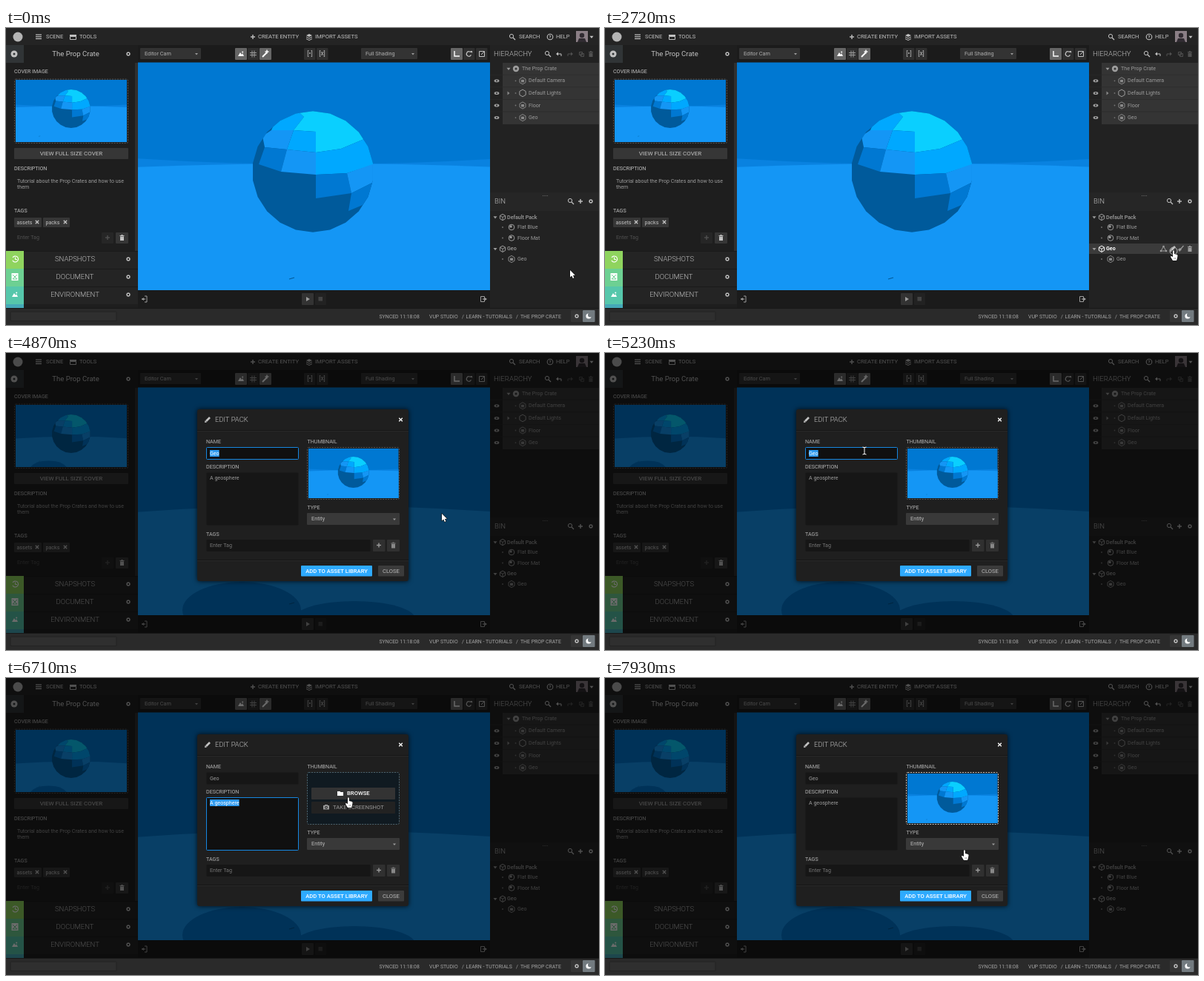
These frames come from a looping animation (800x401 px, 8 s). An HTML page with a canvas:

```html
<!DOCTYPE html>
<html lang="en">
<head>
<meta charset="utf-8">
<title>Scene editor</title>
<style>
html, body { margin: 0; width: 100%; height: 100%; overflow: hidden; background: #1c1c1c; }
canvas { display: block; width: 800px; height: 401px; }
</style>
</head>
<body>
<canvas id="stage"></canvas>
<script>
const LOOP = 8000;
const canvas = document.getElementById('stage');
const ctx = canvas.getContext('2d');
const dpr = window.devicePixelRatio || 1;
canvas.width = 800 * dpr;
canvas.height = 401 * dpr;

const GREY = '#9c9c9c', PALE = '#c2c2c2', DIM = '#505050', FIELD = '#161616';
const BLUE = { cyan: '#0acfff', sky: '#00a8ff', light: '#1496f5', mid: '#0078d2', dark: '#005a9b' };

// Pointer stops: time, x, y, shape
const POINTER = [
  [0, 761, 327, 'arrow'], [200, 762, 325, 'arrow'], [630, 763, 312, 'arrow'],
  [780, 766, 308, 'hand'], [1180, 769, 305, 'hand'], [1300, 768, 306, 'hand'],
  [1450, 768, 303, 'hand'], [1570, 767, 302, 'hand'], [1820, 767, 301, 'hand'],
  [2850, 767, 301, 'arrow'], [4870, 588, 217, 'arrow'], [4990, 480, 165, 'arrow'],
  [5110, 398, 143, 'arrow'], [5230, 350, 132, 'beam'], [5350, 313, 130, 'beam'],
  [5480, 316, 132, 'beam'], [5630, 318, 133, 'beam'], [6310, 386, 162, 'beam'],
  [6430, 432, 160, 'hand'], [6560, 460, 161, 'hand'], [6710, 462, 162, 'hand'],
  [6990, 480, 169, 'hand'], [7110, 515, 179, 'hand'], [7230, 468, 176, 'hand'],
  [7660, 469, 177, 'hand'], [7810, 476, 206, 'arrow'], [7930, 485, 233, 'hand']
];

function rect(x, y, w, h, fill) {
  ctx.fillStyle = fill;
  ctx.fillRect(x, y, w, h);
}
function round(x, y, w, h, r, fill, stroke) {
  ctx.beginPath();
  ctx.roundRect(x, y, w, h, r);
  if (fill) { ctx.fillStyle = fill; ctx.fill(); }
  if (stroke) { ctx.strokeStyle = stroke; ctx.lineWidth = 1; ctx.stroke(); }
}
function trace(points, close) {
  ctx.beginPath();
  for (let i = 0; i < points.length; i += 2) ctx.lineTo(points[i], points[i + 1]);
  if (close) ctx.closePath();
}
function poly(points, fill) {
  trace(points, true);
  ctx.fillStyle = fill;
  ctx.fill();
}
function line(points, color = GREY, width = 1, close = false) {
  trace(points, close);
  ctx.strokeStyle = color;
  ctx.lineWidth = width;
  ctx.stroke();
}
function disc(x, y, r, fill) {
  ctx.beginPath();
  ctx.arc(x, y, r, 0, 7);
  ctx.fillStyle = fill;
  ctx.fill();
}
function ring(x, y, r, color = GREY, width = 1, from = 0, to = 6.29) {
  ctx.beginPath();
  ctx.arc(x, y, r, from, to);
  ctx.strokeStyle = color;
  ctx.lineWidth = width;
  ctx.stroke();
}
function ngon(x, y, r, sides) {
  const points = [];
  for (let i = 0; i < sides; i++) {
    const a = i * 2 * Math.PI / sides;
    points.push(x + r * Math.sin(a), y - r * Math.cos(a));
  }
  return points;
}
function text(s, x, y, size = 7.1, color = GREY, weight = 400, align = 'left') {
  ctx.font = `${weight} ${size}px Roboto, "Open Sans", sans-serif`;
  ctx.fillStyle = color;
  ctx.textAlign = align;
  ctx.textBaseline = 'middle';
  ctx.fillText(s, x, y);
}

// Icons
function gear(x, y, c = PALE) {
  for (let i = 0; i < 8; i++) {
    const a = i * Math.PI / 4, u = Math.cos(a), v = Math.sin(a);
    line([x + u * 1.5, y + v * 1.5, x + u * 3, y + v * 3], c, 1.1);
  }
  ring(x, y, 1.8, c, 1.1);
}
function search(x, y, c = PALE) {
  ring(x - 1, y - 1, 2.6, c, 1);
  line([x + 1, y + 1, x + 4, y + 4], c, 1.3);
}
function plus(x, y, c = PALE, r = 3) {
  line([x - r, y, x + r, y], c, 1.4);
  line([x, y - r, x, y + r], c, 1.4);
}
function cross(x, y, r, c) {
  line([x - r, y - r, x + r, y + r], c, 1.3);
  line([x - r, y + r, x + r, y - r], c, 1.3);
}
function trash(x, y, c = GREY) {
  rect(x - 3, y - 3, 6, 1, c);
  rect(x - 1, y - 4, 2, 1, c);
  rect(x - 2.5, y - 1.5, 5, 5.5, c);
}
function caret(x, y, c = GREY, r = 2) {
  poly([x - r, y - r / 2, x + r, y - r / 2, x, y + r * .8], c);
}
function hex(x, y, r, c = GREY) {
  line(ngon(x, y, r, 6), c, 1, true);
}
function cube(x, y, c = GREY) {
  hex(x, y, 4.2, c);
  line([x - 3.5, y - 2, x, y, x + 3.5, y - 2], c, .9);
  line([x, y, x, y + 4], c, .9);
}
function entity(x, y) {
  hex(x, y, 4.6, '#888');
  rect(x - 2, y - 1.5, 4, 3.5, '#888');
}
function material(x, y) {
  ring(x, y, 3.8, GREY, 1);
  poly([x - 2.5, y - 2.5, x + .5, y - 2.5, x + .5, y + .5, x - 2.5, y + .5], GREY);
}
function eye(x, y) {
  ctx.beginPath();
  ctx.ellipse(x, y, 3.4, 2, 0, 0, 7);
  ctx.fillStyle = GREY;
  ctx.fill();
  disc(x, y, 1, '#222');
}
function hill(x, y, c) {
  poly([x - 4, y + 3, x - 1, y - 2, x + 1, y + 1, x + 2, y - 1, x + 4, y + 3], c);
  disc(x + 2.2, y - 2.5, 1, c);
}
function curl(x, y, c, dir) {
  line([x + 3 * dir, y + 3, x + 3 * dir, y, x - 2 * dir, y], c, 1);
  poly([x - 4 * dir, y, x - dir, y - 2.5, x - dir, y + 2.5], c);
}
function brush(x, y, c) {
  line([x + 3.5, y - 4, x, y], c, 1.2);
  poly([x - 4, y + 1, x - 1, y - 1, x + 1, y + 1, x - 2, y + 4], c);
}
function pencil(x, y, c) {
  line([x - 2, y + 2, x + 3, y - 3], c, 2.6);
  poly([x - 4, y + 4, x - 3.4, y + 1, x - 1, y + 3.4], c);
}

function sphere() {
  ctx.save();
  trace(ngon(414, 194, 81.8, 22), true);
  ctx.clip();
  rect(330, 110, 168, 168, BLUE.dark);
  poly([358, 138, 366, 120, 391, 110, 402, 120, 388, 138], BLUE.sky);
  poly([391, 110, 450, 105, 500, 145, 483, 150, 452, 163, 418, 168, 418, 140, 388, 138, 402, 120], BLUE.cyan);
  poly([388, 138, 418, 140, 418, 168, 452, 163, 483, 150, 500, 145, 500, 183, 460, 196, 418, 198, 418, 168, 379, 164], BLUE.sky);
  poly([349, 161, 346, 146, 358, 138, 388, 138, 379, 164], BLUE.light);
  poly([341, 184, 349, 161, 379, 164, 371, 194], BLUE.mid);
  poly([379, 164, 418, 168, 418, 198, 371, 194], BLUE.light);
  poly([418, 198, 460, 196, 466, 223, 418, 230], BLUE.mid);
  poly([460, 196, 500, 182, 500, 206, 466, 223], BLUE.light);
  poly([466, 223, 500, 206, 493, 234, 462, 247], BLUE.mid);
  ctx.restore();
}

function fillBelow(edge, bend, color) {
  ctx.beginPath();
  ctx.moveTo(-5, edge);
  ctx.quadraticCurveTo(237, edge + bend, 490, edge);
  ctx.lineTo(490, 340);
  ctx.lineTo(-5, 340);
  ctx.fillStyle = color;
  ctx.fill();
}

// The rendered view, also used scaled down for the pictures
function scene(x, y, w, h, scale, lift, speckX, speckY, dim) {
  ctx.save();
  ctx.beginPath();
  ctx.rect(x, y, w, h);
  ctx.clip();
  ctx.translate(x, y - lift);
  ctx.scale(scale, scale);
  rect(-5, -5, 495, 345, BLUE.mid);
  if (dim) fillBelow(168, -18, BLUE.light);
  else {
    fillBelow(129, 16, '#0982e0');
    fillBelow(141, -10, BLUE.light);
  }
  if (dim) {
    ctx.fillStyle = BLUE.mid;
    for (const [cx, cy, rx, ry] of [[140, 300, 80, 38], [292, 312, 82, 24]]) {
      ctx.beginPath();
      ctx.ellipse(cx, cy, rx, ry, 0, 0, 7);
      ctx.fill();
    }
  }
  line([speckX - 3, speckY + 1, speckX + 4, speckY - 1], BLUE.dark, 1.2);
  ctx.translate(-178, -47);
  sphere();
  ctx.restore();
}
function dashed(x, y, w, h, color) {
  ctx.setLineDash([2, 1.5]);
  round(x, y, w, h, 2, null, color);
  ctx.setLineDash([]);
}

function topBar() {
  rect(0, 0, 800, 23, '#242424');
  disc(16, 12, 6.5, '#b4b4b4');
  for (let i = 0; i < 3; i++) rect(40, 8.5 + i * 2.7, 8, 1.2, PALE);
  text('SCENE', 54, 12, 7.5, PALE);
  rect(86, 9, 9, 2, PALE);
  round(86.5, 11.5, 8, 4, 0, null, PALE);
  text('TOOLS', 99, 12, 7.5, PALE);
  plus(333, 12, PALE);
  text('CREATE ENTITY', 340, 12, 7.7, PALE);
  poly([405, 10, 409, 8, 413, 10, 409, 12], PALE);
  line([405, 12, 409, 14, 413, 12], PALE);
  line([405, 14.5, 409, 16.5, 413, 14.5], PALE);
  text('IMPORT ASSETS', 417, 12, 7.7, PALE);
  search(683, 12);
  text('SEARCH', 692, 12, 7.5, PALE);
  ring(734, 12, 3.8, PALE, 1.1);
  text('?', 734, 12.3, 6, PALE, 700, 'center');
  text('HELP', 742, 12, 7.5, PALE);
  rect(769, 4, 16, 15, '#8b7f86');
  disc(777, 10, 3.2, '#302b31');
  poly([771, 19, 773, 14, 781, 14, 783, 19], '#302b31');
  caret(790, 12, PALE, 2.5);
}

function sidebar(dim) {
  rect(0, 23, 178, 355, '#1e1e1e');
  rect(0, 23, 24, 24, '#303436');
  disc(11, 35, 4.5, PALE);
  disc(11, 35, 1.5, '#303436');
  text('The Prop Crate', 94, 35, 9.6, PALE, 400, 'center');
  gear(165, 35);
  rect(174, 47, 4, 260, '#303030');
  text('COVER IMAGE', 11, 59, 7.1, PALE);
  scene(13, 70, 150, 84, .317, 7.6, 101, 264, dim);
  dashed(11.5, 69, 153, 86.5, '#555');
  round(11, 162, 154, 15, 1, '#363636');
  text('VIEW FULL SIZE COVER', 88, 170, 8, PALE, 400, 'center');
  text('DESCRIPTION', 11, 190, 7.1, PALE);
  text('Tutorial about the Prop Crates and how to use', 15, 207, 7.1, GREY);
  text('them', 15, 215, 7.1, GREY);
  text('TAGS', 11, 247, 7.1, PALE);
  for (const [name, x, w] of [['assets', 11, 37], ['packs', 50, 36]]) {
    round(x, 256, w, 13, 1, '#363636');
    text(name, x + 3.5, 262.5, 7.1, PALE);
    cross(x + w - 6, 262, 2.2, PALE);
  }
  text('Enter Tag', 15, 283, 7.1, '#505050');
  round(129, 276, 16, 15, 1, '#262626');
  plus(137, 283, DIM);
  round(148, 276, 17, 15, 1, '#363636');
  trash(156.5, 283, PALE);
  const tabs = [['SNAPSHOTS', '#8fd45e'], ['DOCUMENT', '#6dd092'], ['ENVIRONMENT', '#56c7ab']];
  tabs.forEach(([name, color], i) => {
    const y = 301 + i * 24;
    rect(0, y, 178, 24, '#242424');
    rect(24, y, 154, 1, '#1a1a1a');
    rect(0, y, 24, 24, color);
    text(name, 93, y + 11, 9.5, PALE, 300, 'center');
    gear(165, y + 11);
  });
  rect(0, 373, 24, 5, '#45a9b8');
  ring(12.5, 312, 4, '#fff', 1.2, -2.6, 2.7);
  line([12.5, 309.5, 12.5, 312.5, 15, 312.5], '#fff');
  rect(7.5, 331, 9, 10, '#fff');
  line([9, 333, 15, 339, 9, 339, 15, 333], '#6dd092', 1);
  hill(12, 360, '#fff');
}

function select(label, x, y, w) {
  round(x, y, w, 15, 1, '#333');
  text(label, x + 6, y + 7.5, 7.3, '#b0b0b0');
  caret(x + w - 6, y + 8, GREY);
}
function viewport(dim) {
  rect(178, 23, 475, 355, '#1b1b1b');
  select('Editor Cam', 181, 27, 82);
  select('Full Shading', 479, 27, 76);
  for (const x of [309, 342, 600]) round(x, 27, 16, 16, 1, '#666');
  for (const x of [326, 402, 419, 617, 634]) round(x, 27, 15.5, 16, 1, '#2f2f2f');
  hill(317, 35, '#fff');
  for (const d of [-1.5, 1.5]) {
    line([329, 35 + d, 338, 35 + d], GREY, 1);
    line([333.5 + d, 30.5, 333.5 + d, 39.5], GREY, 1);
  }
  line([346, 39, 352, 33], '#fff', 2);
  plus(352, 32, '#fff', 2.5);
  text('[•]', 410, 34.5, 8.5, PALE, 400, 'center');
  text('[x]', 426.5, 34.5, 8.5, PALE, 400, 'center');
  line([605, 31, 605, 38, 612, 38], '#fff', 1.4);
  ring(624.5, 35, 3.2, PALE, 1.2, .4, 5.6);
  poly([626, 31, 629, 31, 629, 34], PALE);
  round(638.5, 31.5, 7, 7, 0, null, PALE);
  line([641, 36, 645, 32], PALE);
  scene(178, 46.5, 475, 307.5, 1, -.5, 207, 291, dim);
  line([187, 362, 190, 362, 190, 370, 187, 370], GREY);
  line([183, 366, 188, 366], GREY, 1.2);
  poly([183, 366, 186, 364, 186, 368], GREY);
  round(399, 358, 16, 16, 1, '#333');
  poly([405, 363, 410, 366, 405, 369], GREY);
  round(417, 358, 15, 16, 1, '#222');
  rect(421.5, 363, 5.5, 5.5, '#444');
  round(640.5, 362.5, 5, 7, 0, null, GREY);
  line([643, 366, 648, 366], GREY, 1.2);
  poly([649, 366, 646, 364, 646, 368], GREY);
}

function hierarchy() {
  rect(653, 23, 147, 355, '#222');
  text('HIERARCHY', 658, 35.5, 9.6, PALE, 300);
  search(731, 35);
  curl(746, 35, PALE, 1);
  curl(761, 35, DIM, -1);
  round(773.5, 32.5, 4, 4, 0, null, DIM);
  round(775.5, 34.5, 4, 4, 0, null, DIM);
  trash(789, 35, DIM);
  rect(670, 47, 130, 83, '#343434');
  caret(678, 55, GREY, 2.5);
  disc(688, 55, 4.2, GREY);
  disc(688, 55, 1.5, '#343434');
  text('The Prop Crate', 696, 55, 7.1, GREY);
  ['Default Camera', 'Default Lights', 'Floor', 'Geo'].forEach((name, i) => {
    const y = 71.3 + i * 16.6;
    rect(653, y - 8.5, 147, .7, '#2a2a2a');
    eye(662, y);
    if (i === 1) {
      poly([676.5, y - 2.5, 679.5, y, 676.5, y + 2.5], '#888');
      hex(697, y, 4.8);
    } else entity(697, y);
    disc(687.5, y, .9, '#777');
    text(name, 705, y, 7.1, GREY);
  });
}

function bin(hover) {
  rect(653, 222, 147, 25, '#262626');
  for (let i = 0; i < 4; i++) rect(724 + i * 2, 226, 1, 1, '#666');
  text('BIN', 659, 234.5, 9.5, PALE, 300);
  search(762, 234);
  plus(775, 234);
  gear(789, 234);
  if (hover === 'pack') rect(653, 291, 147, 14, '#3b3b3b');
  if (hover === 'item') rect(653, 306, 147, 13, '#3b3b3b');
  const pack = (name, y, hot) => {
    const c = hot ? '#fff' : GREY;
    caret(660, y, GREY, 2.5);
    cube(670, y, c);
    text(name, 676, y, 7.1, c, hot ? 700 : 500);
  };
  const item = (name, y, icon, hot) => {
    disc(670, y, .9, '#777');
    icon(682, y);
    text(name, 690, y, 7.1, hot ? '#fff' : GREY);
  };
  pack('Default Pack', 255.5, false);
  item('Flat Blue', 269, material, false);
  item('Floor Mat', 283.5, material, false);
  pack('Geo', 298.3, hover === 'pack');
  item('Geo', 312, entity, hover === 'item');
  if (hover === 'pack') {
    line([750, 301, 753.5, 295, 757, 301], GREY, 1, true);
    for (const [x, y] of [[750, 301], [753.5, 295], [757, 301]]) disc(x, y, 1.3, GREY);
    pencil(766, 298, PALE);
    brush(777, 298, GREY);
    trash(789, 298, GREY);
  }
}

function statusBar() {
  rect(0, 378, 800, 23, '#2a2a2a');
  rect(0, 378, 800, 1, '#181818');
  round(6, 383, 143, 12.5, 1, '#2f2f2f', '#222');
  const label = (s, x) => text(s, x, 389.5, 6.9, '#a4a4a4');
  label('SYNCED 11:18:08', 503.5);
  label('VUP STUDIO', 571);
  label('/', 615);
  label('LEARN - TUTORIALS', 620.5);
  label('/', 688);
  label('THE PROP CRATE', 694);
  round(762, 381, 16, 16, 1, '#353535');
  gear(770, 389, PALE);
  round(778, 381, 16.5, 16, 1, '#737b80');
  disc(786, 389, 3.6, '#fff');
  disc(788, 387.5, 3, '#737b80');
}

function field(x, y, w, h, focused) {
  round(x, y, w, h, 1, focused ? '#101010' : FIELD, focused ? '#1687e0' : null);
}
function marked(s, x, y, on) {
  if (on) {
    ctx.font = '400 7.1px Roboto, "Open Sans", sans-serif';
    rect(x, y - 4.5, ctx.measureText(s).width, 9, '#2f9bf0');
  }
  text(s, x, y, 7.1, on ? '#fff' : GREY);
}
function thumbnail(t, mx, my) {
  const over = mx >= 406 && mx < 531 && my >= 127 && my < 198;
  if (!over) {
    scene(408, 129, 121.5, 67, .257, 5.8, 101, 264, false);
    dashed(406.5, 127.5, 124, 70, t > 7600 ? '#c8c8c8' : '#555');
    return;
  }
  rect(407, 128, 123, 69, '#101a21');
  dashed(406.5, 127.5, 124, 70, '#4b6470');
  const inX = mx >= 412 && mx <= 525;
  const browse = inX && my >= 148 && my < 164;
  const shot = inX && my >= 166 && my < 183;
  round(412, 148, 113, 16, 1, '#333');
  round(412, 167, 113, 16, 1, '#222');
  const a = browse ? '#fff' : '#999', b = shot ? '#fff' : '#999';
  rect(447, 153, 4, 2, a);
  rect(447, 154, 8, 5, a);
  text('BROWSE', 460, 156, 7.7, a, browse ? 500 : 400);
  rect(428, 172, 8, 5.5, b);
  rect(430, 171, 4, 2, b);
  ring(432, 174.7, 1.5, '#222', 1);
  text('TAKE SCREENSHOT', 441, 175, 7.7, b, shot ? 500 : 400);
}
function modal(t, mx, my) {
  const focus = t < 5630 ? 'name' : t < 7540 ? 'about' : '';
  ctx.save();
  ctx.shadowColor = 'rgba(0,0,0,.8)';
  ctx.shadowBlur = 6 * dpr;
  round(258, 76, 285, 232, 3, '#1f1f1f');
  ctx.restore();
  rect(258, 104, 285, 1, '#151515');
  rect(258, 105, 285, 1, '#292929');
  rect(258, 279, 285, 1, '#151515');
  rect(258, 280, 285, 1, '#292929');
  pencil(272, 90, PALE);
  text('EDIT PACK', 282, 90, 9.4, PALE, 300);
  cross(532.5, 90, 2.3, '#fff');
  text('NAME', 270, 120, 7.1, '#b4b4b4');
  field(270.5, 127.5, 124, 16, focus === 'name');
  marked('Geo', 275, 135.5, focus === 'name');
  text('DESCRIPTION', 270, 154, 7.1, '#b4b4b4');
  field(270.5, 161.5, 124, 71, focus === 'about');
  marked('A geosphere', 275, 168.5, focus === 'about');
  text('THUMBNAIL', 406.5, 120, 7.1, '#b4b4b4');
  thumbnail(t, mx, my);
  text('TYPE', 406.5, 208.5, 7.1, '#b4b4b4');
  round(406, 216, 125, 16, 1, '#393939');
  text('Entity', 412, 224, 7.3, '#bbb');
  caret(524, 224.5, GREY);
  text('TAGS', 270, 244.5, 7.1, '#b4b4b4');
  field(270.5, 252, 221, 16, false);
  text('Enter Tag', 275, 260, 7.1, '#777');
  round(495, 252, 16.5, 16, 1, '#303030');
  plus(503, 259.5, GREY);
  round(514, 252, 17, 16, 1, '#303030');
  trash(522.5, 259.5, '#888');
  round(398, 287, 96, 14.5, 1, '#2eaaff');
  text('ADD TO ASSET LIBRARY', 446, 294.3, 7.6, '#fff', 500, 'center');
  round(502, 287, 35, 14.5, 1, '#3b3b3b');
  text('CLOSE', 519.5, 294.3, 7.6, '#bbb', 400, 'center');
}

function pointer(x, y, shape) {
  ctx.save();
  ctx.translate(x, y);
  ctx.lineJoin = 'round';
  if (shape === 'beam') {
    line([-2.5, -5, 0, -4.3, 2.5, -5], '#fff', 1);
    line([-2.5, 5, 0, 4.3, 2.5, 5], '#fff', 1);
    line([0, -4.5, 0, 4.5], '#fff', 1);
  } else {
    const shapeOf = {
      arrow: [0, 0, 0, 9.5, 2.2, 7.5, 3.8, 11, 5.4, 10.2, 3.9, 7, 6.8, 6.7],
      hand: [-1, -.5, .8, -.5, 1, 4, 5, 5, 5.6, 6.2, 5, 10, 4, 13, -1, 13, -4, 8, -3.4, 6.8, -1, 8]
    };
    line(shapeOf[shape], '#111', 1.2, true);
    poly(shapeOf[shape], '#fff');
    if (shape === 'hand') for (const u of [1, 2.6]) line([u, 9, u, 11.5], '#777', .6);
  }
  ctx.restore();
}

function draw(t) {
  const [, mx, my, shape] = POINTER.findLast(stop => stop[0] <= t);
  const open = t >= 2850;
  const hover = open || t < 780 ? '' : t < 1450 ? 'item' : 'pack';
  ctx.setTransform(dpr, 0, 0, dpr, 0, 0);
  topBar();
  sidebar(open);
  viewport(open);
  hierarchy();
  bin(hover);
  statusBar();
  if (open) {
    rect(0, 0, 800, 378, 'rgba(0,0,0,.58)');
    modal(t, mx, my);
  }
  const click = (t >= 2720 && !open) || (t >= 7540 && t < 7660);
  if (click) ring(mx, my, 5, '#bbb', 1);
  pointer(mx, my, shape);
}

const start = performance.now();
function tick() {
  draw((performance.now() - start) % LOOP);
  requestAnimationFrame(tick);
}
tick();
</script>
</body>
</html>
```
